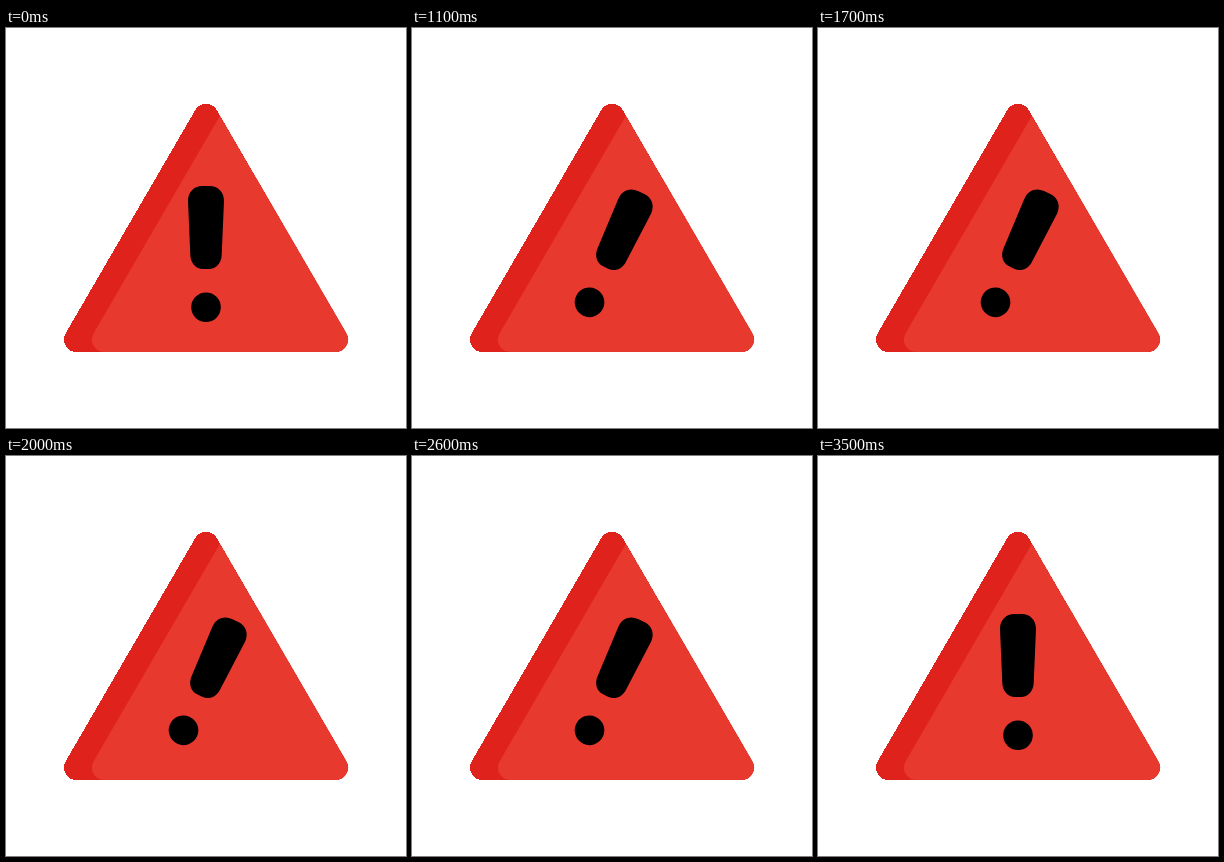
Write an HTML page that moves like this. It is 400 px wide and 400 px high and loops after 3530 ms.

```html
<!DOCTYPE html>
<html lang="en">
<head>
<meta charset="utf-8">
<title>Warning sign</title>
<style>
  html, body { margin: 0; width: 100%; height: 100%; overflow: hidden; background: #fff; }
  svg { display: block; width: 100vw; height: 100vh; }
</style>
</head>
<body>
<svg viewBox="0 0 400 400">
  <defs>
    <path id="sign" d="M59.67 305.25 L189.17 82.25 A12.5 12.5 0 0 1 210.83 82.25
      L340.33 305.25 A12.5 12.5 0 0 1 329.5 324 H70.5 A12.5 12.5 0 0 1 59.67 305.25 Z"/>
    <clipPath id="inside"><use href="#sign"/></clipPath>
  </defs>
  <use href="#sign" fill="#df231c" shape-rendering="crispEdges"/>
  <g clip-path="url(#inside)">
    <use href="#sign" x="28" fill="#e8392f"/>
    <path d="M200 150 L260 150 L345 300 V330 H200 Z" fill="#e8392f"/>
  </g>
  <g id="mark">
    <path d="M182 173 C182 164 188 158 196.500 158 H203.500 C212 158 218 164 218 173
      L215.700 227 C215.500 235 210 241 203 241 H197 C190 241 184.500 235 184.300 227 Z"/>
    <circle cx="200" cy="279.300" r="14.800"/>
  </g>
</svg>
<script>
  const LOOP = 3530, REST = 530, STEP = 30;
  const SWING = 30;          // degrees to each side
  const HALF = 5;            // steps from one side to the other
  const FIRST = 5.87;        // step of the first left extreme
  const LAST = FIRST + 15 * HALF;  // last right extreme
  const END = 100;
  const mark = document.getElementById('mark');

  const ease = p => p * p * (3 - 2 * p);

  function angle(step) {
    if (step <= 0 || step >= END) return 0;
    if (step < FIRST) return -SWING * ease(step / FIRST);
    if (step < LAST) {
      const legs = (step - FIRST) / HALF;
      const n = Math.floor(legs);
      const side = n % 2 ? 1 : -1;
      return side * SWING * (1 - 2 * ease(legs - n));
    }
    const left = (END - step) / (END - LAST);
    return SWING * Math.pow(left, 2.15);
  }

  function draw(time) {
    const t = time % LOOP;
    const step = t < REST ? 0 : Math.floor((t - REST) / STEP) + 1;
    mark.setAttribute('transform', `rotate(${angle(step).toFixed(3)} 200 226.5)`);
  }

  let start = null;
  function tick(now) {
    if (start === null) start = now;
    draw(now - start);
    requestAnimationFrame(tick);
  }
  draw(0);
  requestAnimationFrame(tick);
</script>
</body>
</html>
```
